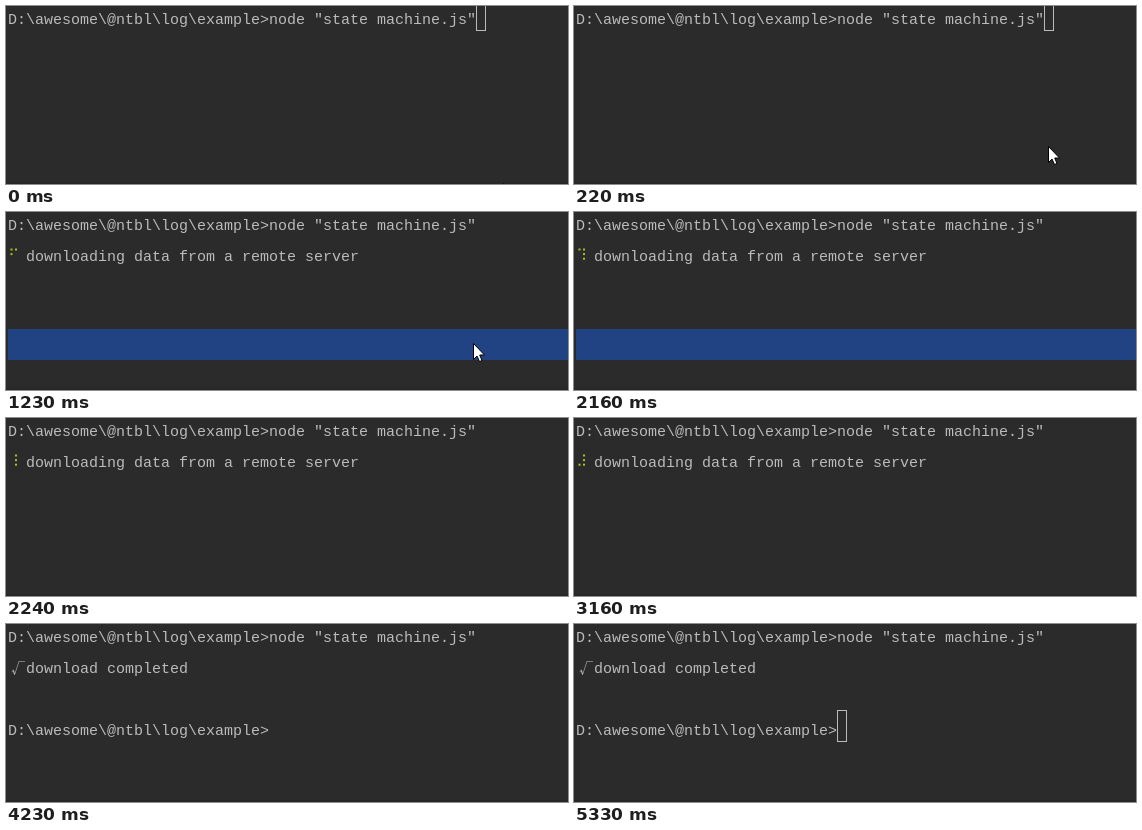
An HTML page that plays this animation: 562 by 178 pixels, repeating every 5410 ms.

```html
<!DOCTYPE html>
<html lang="en">
<head>
<meta charset="utf-8">
<title>Terminal</title>
<style>
  html, body { margin: 0; width: 100%; height: 100%; overflow: hidden; background: #2b2b2b; }
  svg { display: block; }
  text { font: 15px "Liberation Mono", "DejaVu Sans Mono", monospace; fill: #bbb; white-space: pre; }
  #tick { font: 14px "Noto Sans CJK SC", "DejaVu Sans", sans-serif; }
</style>
</head>
<body>
<svg width="562" height="178" viewBox="0 0 562 178">
  <rect y="176" width="562" height="2" fill="#272727"/>
  <rect id="line" x="2" y="117" width="560" height="31" fill="#214283"/>
  <text x="2" y="18">D:\awesome\@ntbl\log\example&gt;node "state machine.js"</text>
  <g id="busy">
    <text x="20" y="49">downloading data from a remote server</text>
    <g id="dots" fill="#a8c023"></g>
  </g>
  <g id="done">
    <text id="tick" x="5" y="49">√</text>
    <text x="20" y="49">download completed</text>
    <text x="2" y="111">D:\awesome\@ntbl\log\example&gt;</text>
  </g>
  <rect id="block" width="9" height="31" fill="#bbb"/>
  <rect id="outline" width="9" height="31" fill="none" stroke="#bbb"/>
  <path id="mouse" d="M.5 .5V16.5L4 13L6.5 18.5L9 17.5L6.7 12H11.5Z" fill="#fff" stroke="#000"/>
</svg>
<script>
const LOOP = 5410;
const $ = id => document.getElementById(id);
const show = (id, on) => $(id).setAttribute('visibility', on ? 'visible' : 'hidden');
const move = (id, x, y) => $(id).setAttribute('transform', `translate(${x} ${y})`);

// Latest [start, ...values] entry that has begun
const at = (steps, t) => steps.filter(s => s[0] <= t).pop().slice(1);

const MOUSE = [[0, 497, 177], [70, 487, 160], [150, 474, 140], [230, 468, 130],
  [310, 467, 129], [470, 467, 131], [1540, null]];

const CURSOR = [[0, 'outline', 470, -7], [310, 'block', 470, -7], [780, ''],
  [930, 'block', 2, 24], [1230, ''], [3240, 'block', 263, 86], [4230, ''],
  [4780, 'block', 263, 86], [5260, ''], [5330, 'outline', 263, 86]];

// Lit braille dots per spinner step: 1-3 left column, 4-6 right column
const SPIN = ['124', '145', '1456', '456', '3456', '356', '236', '1236', '123', '1234'];

const dots = [0, 1, 2, 3, 4, 5].map(i => {
  const dot = document.createElementNS('http://www.w3.org/2000/svg', 'rect');
  const attrs = { x: i < 3 ? 4.5 : 9, y: 36.5 + i % 3 * 4.6, width: 2, height: 2 };
  for (const k in attrs) dot.setAttribute(k, attrs[k]);
  return $('dots').appendChild(dot);
});

function spinStep(t) {
  if (t < 2390) return Math.min(13, Math.floor((t - 1229) / 77.2));
  return t < 2540 ? 15 : 16 + Math.floor((t - 2540) / 77);
}

function draw(t) {
  const busy = t >= 1230 && t < 3240;
  show('line', t >= 310 && t < 2240);
  show('busy', busy);
  show('done', t >= 3240);

  const lit = busy ? SPIN[spinStep(t) % SPIN.length] : '';
  dots.forEach((dot, i) => dot.setAttribute('opacity', lit.includes(i + 1) ? 1 : 0));

  const [kind, cx, cy] = at(CURSOR, t);
  show('block', kind === 'block');
  show('outline', kind === 'outline');
  if (kind === 'block') move(kind, cx, cy);
  if (kind === 'outline') move(kind, cx + .5, cy + .5);

  const [mx, my] = at(MOUSE, t);
  show('mouse', mx !== null);
  if (mx !== null) move('mouse', mx, my);
}

const start = performance.now();
function frame() {
  draw((performance.now() - start) % LOOP);
  requestAnimationFrame(frame);
}
frame();
</script>
</body>
</html>
```
